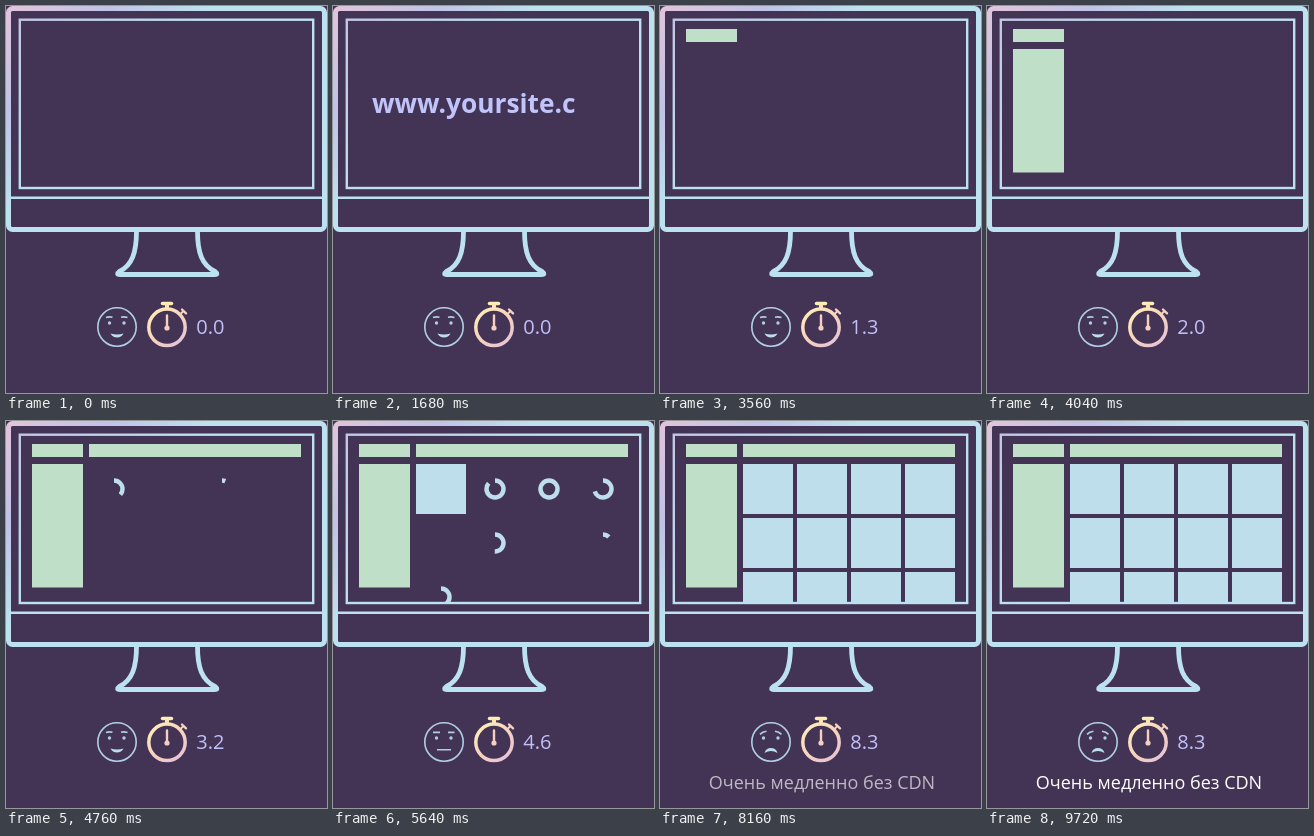
An HTML page that plays this animation: 321x387 px, repeating every 10 s.

```html
<!DOCTYPE html>
<html lang="ru">
<head>
<meta charset="utf-8">
<title>Загрузка сайта без CDN</title>
<style>
  html, body { margin: 0; width: 100%; height: 100%; overflow: hidden; background: #433355; }
  svg { display: block; width: 100%; height: 100%; font-family: "Open Sans", "Noto Sans", sans-serif; }

  .url, .cursor, .block, .face, .caption { animation: 10s linear infinite both; }
  .url { animation-name: url; transform-origin: 160.5px 96.5px; }
  .cursor { animation-name: cursor; }
  .logo { animation-name: logo; }
  .side { animation-name: side; }
  .head { animation-name: head; }
  .happy { animation-name: happy; }
  .calm { animation-name: calm; }
  .sad { animation-name: sad; }
  .caption { animation-name: caption; }

  @keyframes url {
    0%, 21.8% { transform: none; opacity: 1; animation-timing-function: ease-in-out; }
    24.8%, 30% { transform: scale(.915); opacity: 1; }
    32.4%, 100% { transform: scale(.915); opacity: 0; }
  }
  @keyframes cursor {
    0%, 21.8% { transform: translate(307px, 137px); animation-timing-function: ease-out; }
    24.8%, 30% { transform: translate(219px, 102px); animation-timing-function: ease-in; }
    32.8%, 100% { transform: translate(307px, 137px); }
  }
  @keyframes logo { 0%, 33% { opacity: 0; } 35%, 100% { opacity: 1; } }
  @keyframes side { 0%, 37.8% { opacity: 0; } 39.8%, 100% { opacity: 1; } }
  @keyframes head { 0%, 42.6% { opacity: 0; } 44.6%, 100% { opacity: 1; } }
  @keyframes happy { 0%, 51% { opacity: 1; } 53%, 100% { opacity: 0; } }
  @keyframes calm { 0%, 51% { opacity: 0; } 53%, 72% { opacity: 1; } 74%, 100% { opacity: 0; } }
  @keyframes sad { 0%, 72% { opacity: 0; } 74%, 100% { opacity: 1; } }
  @keyframes caption {
    0%, 62%, 68.8%, 75.6%, 82.4%, 89.2%, 96% { opacity: 0; }
    63.2%, 67.6%, 70%, 74.4%, 76.8%, 81.2%, 83.6%, 88%, 90.4%, 94.8%, 97.2%, 100% { opacity: 1; }
  }
</style>
</head>
<body>
<svg viewBox="0 0 321 387">
  <defs>
    <linearGradient id="frame" gradientUnits="userSpaceOnUse" x1="0" y1="0" x2="105" y2="105">
      <stop offset="0" stop-color="#e2c4da"/>
      <stop offset=".5" stop-color="#c0c3e6"/>
      <stop offset="1" stop-color="#bde2ef"/>
    </linearGradient>
    <linearGradient id="inner" gradientUnits="userSpaceOnUse" x1="10" y1="10" x2="110" y2="110">
      <stop offset="0" stop-color="#c2c6e6"/>
      <stop offset="1" stop-color="#bde2ef"/>
    </linearGradient>
    <linearGradient id="watch" gradientUnits="userSpaceOnUse" x1="147" y1="302" x2="176" y2="338">
      <stop offset="0" stop-color="#fdeeb8"/>
      <stop offset=".5" stop-color="#f8d3bd"/>
      <stop offset="1" stop-color="#e6c3d6"/>
    </linearGradient>
    <clipPath id="screen"><path d="M15 15H306V181H15Z"/></clipPath>
  </defs>

  <g clip-path="url(#screen)">
    <g fill="#c0dfc8">
      <path class="block logo" d="M26 23H77V36H26Z"/>
      <path class="block side" d="M26 43H77V166.5H26Z"/>
      <path class="block head" d="M83 23H295V36H83Z"/>
    </g>
    <g id="tiles"></g>
    <g class="url"><text id="url" x="39" y="106.8" font-size="26.3" font-weight="700" fill="#c0c4fb"></text></g>
    <path class="cursor" fill="#c0dfc8" d="M0 0V15L3.3 12.2 6.2 18.3 8.8 17.1 6 11.2 10.8 10.9Z"/>
  </g>

  <g fill="none" stroke="url(#frame)">
    <rect x="2.5" y="2.5" width="316" height="221" rx="4" stroke-width="5"/>
    <rect x="13.8" y="13.7" width="293.4" height="168.3" stroke="url(#inner)" stroke-width="2.4"/>
    <path d="M4 191.7H317V191.8H4Z" stroke="#bde2ef" stroke-width="2.2"/>
    <path stroke="#bde2ef" stroke-width="4.8" stroke-linejoin="round"
      d="M130.5 225C130.5 247 126 259 113.5 265.5Q109.5 268.5 114 268.5H208.5Q213 268.5 209 265.5C196 259 191.5 247 191.5 225"/>
  </g>

  <g fill="none" stroke="#b0cfe6" stroke-width="1.6">
    <g class="face happy">
      <circle cx="111" cy="321" r="19.2"/>
      <path d="M100 311.6Q103 310.4 106.500 311.200M115 311.200Q118 310.400 121.500 311.600"/>
      <path d="M104.500 327.500Q111 329.500 117.500 327.500Q115.500 331.500 111 331.500Q106.500 331.500 104.500 327.500Z" fill="#bddeea" stroke="none"/>
    </g>
    <g class="face calm">
      <circle cx="111" cy="321" r="19.2"/>
      <path d="M100 311.400H107M115 311.400H121.500M104 328.700H118"/>
    </g>
    <g class="face sad">
      <circle cx="111" cy="321" r="19.2"/>
      <path d="M100 313.400Q102.500 310.600 106.500 310.200M115 310.200Q119 310.600 121.500 313.400"/>
      <path d="M104.500 332Q106 327 111 327Q116 327 117.500 332Q111 328 104.500 332Z" fill="#bddeea" stroke="none"/>
    </g>
    <g fill="#b0cfe6" stroke="none">
      <circle cx="103.500" cy="317" r="1.7"/>
      <circle cx="118" cy="317" r="1.7"/>
    </g>
  </g>

  <g fill="none" stroke="url(#watch)" stroke-width="3.500">
    <circle cx="161" cy="321.300" r="18.200"/>
    <path d="M156.500 297.600H165.500" stroke="#fdeeb8" stroke-linecap="round"/>
    <path d="M161 298V304" stroke="#fbe3ba" stroke-width="4"/>
    <path d="M174 308.500L178 304.500" stroke="#f6d2c0" stroke-width="2"/>
    <path d="M176 303.500L180 307.300" stroke="#f6d2c0" stroke-width="2.400" stroke-linecap="round"/>
    <path d="M161 309.500L161.010 322" stroke="#f6cfc0" stroke-width="2.400" stroke-linecap="round"/>
    <circle cx="161" cy="322" r="2.600" fill="#f6cfc0" stroke="none"/>
  </g>

  <text id="timer" x="190.300" y="328" font-size="20" fill="#c0c0f8">0.0</text>
  <text class="caption" x="162" y="367.500" font-size="18" fill="#fff" text-anchor="middle">Очень медленно без CDN</text>
</svg>
<script>
  const LOOP = 10000, SPIN = 940, R = 8.5, RING = 2 * Math.PI * R;
  const site = 'www.yoursite.com';
  // spinner start times, row by row
  const starts = [
    [4420, 4832, 4702, 4982],
    [5660, 5170, 5813, 5527],
    [5170, 5926, 6170, 5690]
  ];
  const url = document.getElementById('url');
  const timer = document.getElementById('timer');
  const clamp = v => Math.min(1, Math.max(0, v));

  function add(name, attrs) {
    const el = document.createElementNS('http://www.w3.org/2000/svg', name);
    for (const key in attrs) el.setAttribute(key, attrs[key]);
    return document.getElementById('tiles').appendChild(el);
  }

  const tiles = starts.flatMap((row, r) => row.map((start, c) => {
    const x = 83 + 54 * c, y = 43 + 54 * r, cx = x + 25, cy = y + 25;
    return {
      start,
      box: add('rect', { x, y, width: 50, height: 50, fill: '#bddeea' }),
      ring: add('circle', { cx, cy, r: R, fill: 'none', stroke: '#bddeea',
        'stroke-width': 4.5, transform: `rotate(-90 ${cx} ${cy})` })
    };
  }));

  function draw(t) {
    url.textContent = site.slice(0, Math.max(0, Math.floor((t - 42) / 125) + 1));
    timer.textContent = (8.3 * clamp((t - 2760) / 5200)).toFixed(1);
    for (const { start, box, ring } of tiles) {
      const p = clamp((t - start) / SPIN);
      box.style.display = p === 1 ? '' : 'none';
      ring.style.display = p > 0 && p < 1 ? '' : 'none';
      ring.setAttribute('stroke-dasharray', `${p * RING} ${RING}`);
    }
  }

  const begin = performance.now();
  function tick() {
    draw((performance.now() - begin) % LOOP);
    requestAnimationFrame(tick);
  }
  tick();
</script>
</body>
</html>
```
